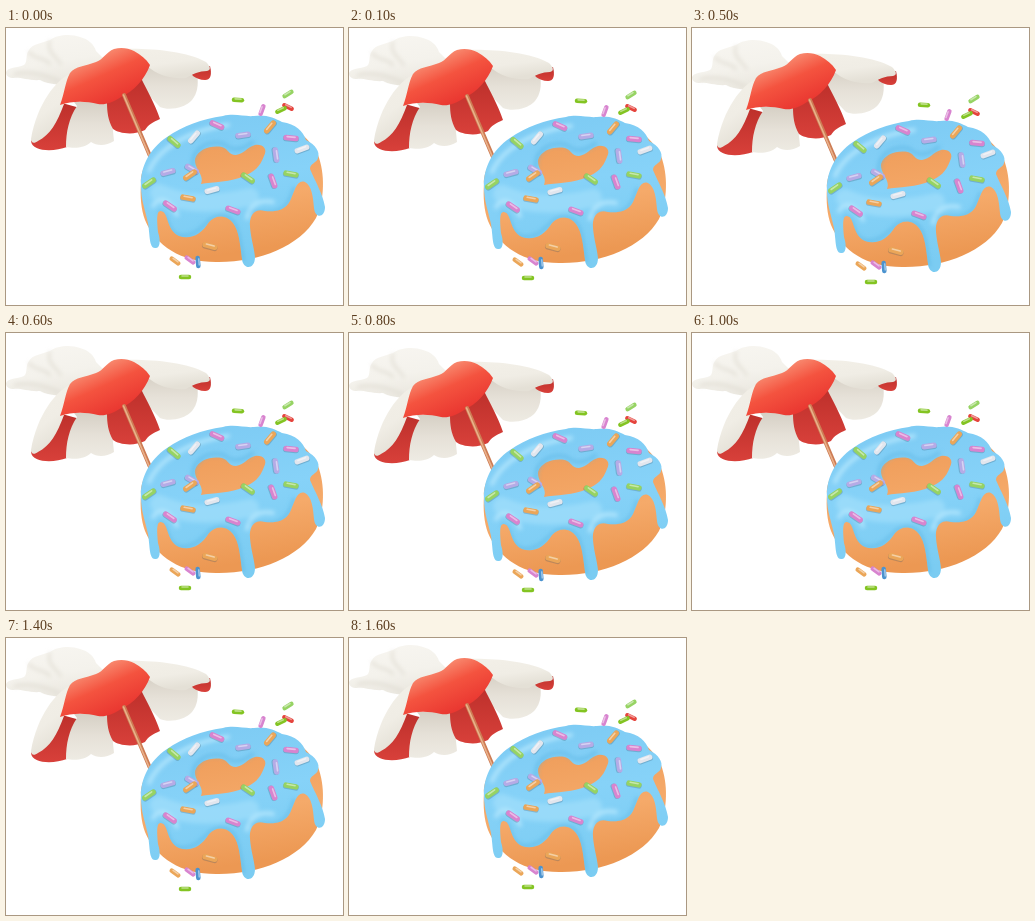
Write an HTML page that moves like this. It is 337 px wide and 277 px high and loops after 1.7 s.

```html
<!DOCTYPE html>
<html lang="en">
<meta charset="utf-8">
<title>Donut and parasol</title>
<style>
  html, body { margin: 0; width: 100%; height: 100%; overflow: hidden; background: #fff; }
  svg { display: block; width: 337px; height: 277px; }
</style>
<svg viewBox="0 0 337 277">
  <defs>
    <linearGradient id="shell" x2=".3" y2="1">
      <stop stop-color="#f8f6f1"/><stop offset=".6" stop-color="#f4f2ec"/><stop offset="1" stop-color="#eae7df"/>
    </linearGradient>
    <linearGradient id="cream" x2=".4" y2="1">
      <stop stop-color="#f3f0e8"/><stop offset=".6" stop-color="#f0ede5"/><stop offset="1" stop-color="#e4e0d6"/>
    </linearGradient>
    <linearGradient id="lining" x2="0" y2="1">
      <stop stop-color="#d6d0c5"/><stop offset=".5" stop-color="#e6e1d8"/><stop offset="1" stop-color="#eeebe3"/>
    </linearGradient>
    <linearGradient id="red" gradientUnits="userSpaceOnUse" x1="84" y1="32" x2="104" y2="76">
      <stop stop-color="#f8866c"/><stop offset=".4" stop-color="#f4533f"/><stop offset="1" stop-color="#e93630"/>
    </linearGradient>
    <linearGradient id="redLining" x2="0" y2="1">
      <stop stop-color="#bd302b"/><stop offset="1" stop-color="#d8403a"/>
    </linearGradient>
    <linearGradient id="dough" x2=".2" y2="1">
      <stop stop-color="#ec9753"/><stop offset=".65" stop-color="#f5aa6a"/><stop offset="1" stop-color="#ec9853"/>
    </linearGradient>
    <linearGradient id="icing" x2=".2" y2="1">
      <stop stop-color="#7ccaf3"/><stop offset=".5" stop-color="#86d2f8"/><stop offset="1" stop-color="#7bccf2"/>
    </linearGradient>
    <filter id="soft" x="-20%" y="-20%" width="140%" height="140%"><feGaussianBlur stdDeviation="2"/></filter>
    <clipPath id="icingClip"><use href="#icingShape"/></clipPath>
  </defs>

  <g id="scene" fill="none" stroke-linecap="round">
    <path fill="url(#shell)" d="M0 44C2 39 11 40 18 37C22 34 19 27 23 22C26 16 36 15 44 12C52 6 66 6 74 9C82 11 88 16 90 23L98 31L60 60C50 54 42 57 34 52C24 53 14 49 8 50C3 50 0 48 0 44Z"/>
    <g stroke="#dedad0" stroke-width="2" filter="url(#soft)">
      <path d="M23 24C29 32 38 29 44 36M44 13C40 23 50 29 55 36M9 46C22 43 37 46 53 53"/>
    </g>

    <!-- parasol lining, canopy and pole -->
    <path fill="url(#redLining)" d="M25 113L56 75L74 80C64 94 61 108 61 119C48 124 26 124 25 113Z"/>
    <path fill="url(#lining)" d="M68 74H104L108 113C100 118 91 118 85 114C78 121 67 120 60 119C60 104 63 90 71 78Z"/>
    <path fill="url(#lining)" d="M128 52L143 36L191 46C193 57 191 66 186 72C179 80 163 83 154 79Z"/>
    <path fill="url(#redLining)" d="M101 74L135 50C142 64 149 76 154 91C147 94 142 97 139 102C127 108 112 105 107 101C102 92 101 84 101 74Z"/>
    <path fill="url(#redLining)" d="M185 45L204 38C206 46 205 52 199 52C194 52 190 50 187 48Z"/>
    <path fill="url(#cream)" d="M64 46C50 52 31 76 25 111C25 115 28 116 32 113C44 107 51 95 58 76Z"/>
    <path fill="url(#cream)" d="M116 21C143 20 180 23 200 34C205 39 205 42 201 43C193 43 187 46 180 50C168 51 153 49 140 37Z"/>
    <path fill="url(#red)" d="M54 77C59 64 59 54 64 45C69 38 80 38 90 34C98 31 100 24 108 21C115 19 122 20 128 23C135 27 140 31 144 37C139 51 128 63 115 69C106 75 99 77 92 76C79 73 66 73 54 77Z"/>
    <path stroke="#cd7c54" stroke-width="4" d="M118 67L144 128"/>
    <path stroke="#eab18a" stroke-width="1.6" d="M117.5 67L143.5 128"/>

    <!-- donut -->
    <path fill="url(#dough)" d="M135 155C134 126 174 94 235 89C281 88 302 107 312 127C319 145 319 172 310 190C294 218 254 234 213 234C177 235 150 219 139 192C135 181 134 168 135 155Z"/>
    <path id="icingShape" fill="url(#icing)" fill-rule="evenodd" d="M135 158C134 140 143 121 161 109C177 98 196 91 217 88C229 85 239 89 248 88C259 86 269 90 276 94C290 96 297 103 300 112C310 117 314 124 312 130C311 135 304 135 304 141C309 153 317 166 319 179C319 190 309 191 308 180C307 169 306 158 299 154C291 151 289 162 284 173C279 183 268 184 259 183C248 180 243 188 244 199C245 211 248 219 249 229C249 242 237 242 236 231C234 215 233 203 227 195C220 186 209 187 203 194C195 207 184 212 173 208C160 202 163 184 155 183C150 182 151 193 152 204C155 213 154 221 149 220C143 220 144 207 142 195C139 181 135 172 135 158ZM195 156C199 147 188 141 189 131C192 121 205 117 216 119C223 121 222 127 230 127C238 126 241 119 249 117C257 116 262 121 258 128C254 139 248 144 238 148C226 154 206 154 195 156Z"/>
    <g clip-path="url(#icingClip)" filter="url(#soft)">
      <path stroke="#a6e2fc" stroke-width="18" opacity=".6" d="M153 165Q188 182 244 169"/>
      <path stroke="#b0e5fd" stroke-width="4" d="M143 143C154 117 190 101 222 97M147 178C155 166 165 174 171 187M241 190Q246 170 267 174"/>
      <path stroke="#57b2e2" stroke-width="3" opacity=".6" d="M153 184C164 184 158 206 175 208C196 209 200 187 216 188C234 190 232 210 237 232M246 184C264 186 281 188 288 160M187 141C184 120 203 112 218 116Q230 127 247 114"/>
    </g>
    <g id="sprinkles"></g>
  </g>
</svg>
<script>
  const colors = {
    green: '#96d363', lime: '#83c422', pink: '#d884cf', purple: '#b5abe6',
    white: '#e2e6ee', orange: '#eba658', red: '#e5433c', blue: '#4b93cf'
  };
  // x, y, angle, colour
  const sprinkles = [
    [211, 97, 25, 'pink'], [188, 109, -50, 'white'], [237, 107, -8, 'purple'],
    [264, 99, -50, 'orange'], [285, 110, 5, 'pink'], [168, 114, 40, 'green'],
    [296, 121, -20, 'white'], [270, 127, 82, 'purple'], [285, 146, 10, 'green'],
    [267, 153, 70, 'pink'], [242, 150, 35, 'green'], [143, 155, -35, 'green'],
    [162, 144, -15, 'purple'], [186, 141, 30, 'purple'], [184, 147, -35, 'orange'],
    [206, 162, -15, 'white'], [182, 170, 10, 'orange'], [164, 178, 35, 'pink'],
    [227, 182, 20, 'pink'], [232, 72, 3, 'lime'], [256, 82, -70, 'pink'],
    [282, 66, -32, 'green'], [282, 79, 25, 'red'], [275, 82, -25, 'lime'],
    [204, 218, 15, 'orange'], [169, 233, 35, 'orange'], [184, 232, 35, 'pink'],
    [192, 234, 85, 'blue'], [179, 249, 0, 'lime']
  ];
  const bar = (color, width, half, y) =>
    `<path stroke="${color}" stroke-width="${width}" d="M${-half} ${y}H${half}"/>`;
  document.getElementById('sprinkles').innerHTML = sprinkles.map(([x, y, angle, name]) => {
    const loose = y < 85 || y > 225;
    const half = loose ? 4 : 5;
    return `<g transform="translate(${x} ${y}) rotate(${angle})">` +
      (loose ? '' : bar('#36536a44', 6, half, .8)) +
      bar(colors[name], loose ? 4.5 : 5.5, half, 0) +
      bar('#ffffff77', 1.6, half - 1, -1) + '</g>';
  }).join('');

  // The whole scene sinks 8 px and rises again, one pixel every 100 ms.
  const scene = document.getElementById('scene');
  function draw(now) {
    const step = Math.floor(now % 1700 / 100);
    scene.setAttribute('transform', `translate(0 ${8 - Math.abs(8 - step)})`);
    requestAnimationFrame(draw);
  }
  requestAnimationFrame(draw);
</script>
</html>
```
